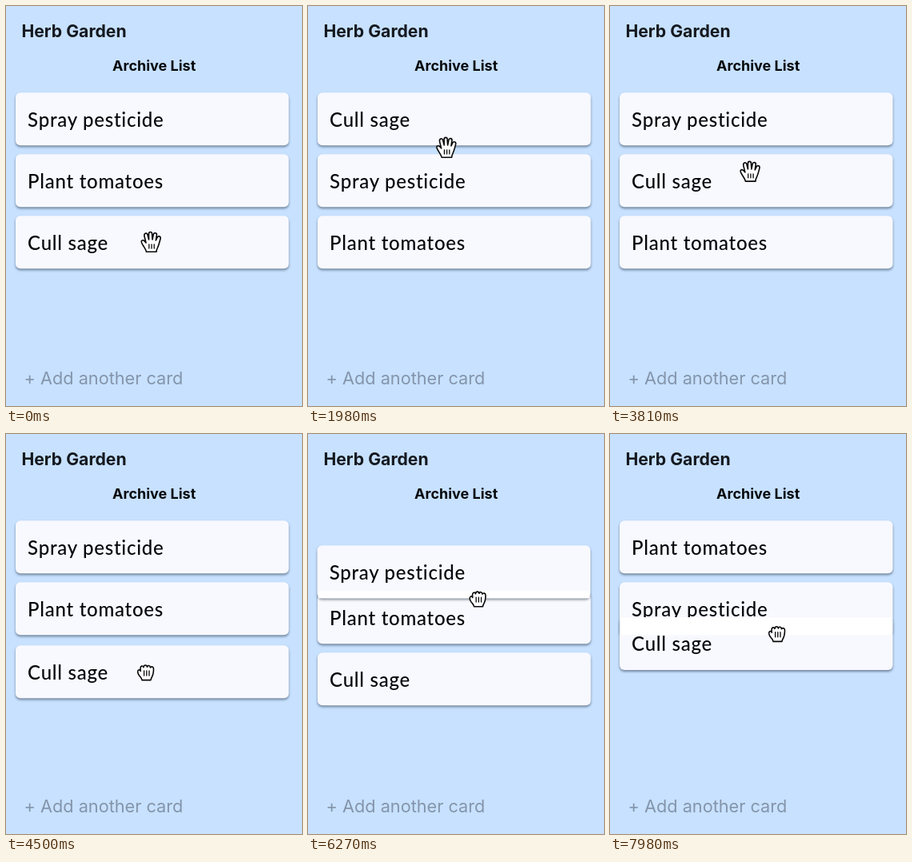
These frames come from a looping animation (370 px wide and 500 px high, 8000 ms). An HTML page:

```html
<!DOCTYPE html>
<html lang="en">
<head>
<meta charset="utf-8">
<title>Herb Garden</title>
<style>
  html, body { margin: 0; width: 100%; height: 100%; overflow: hidden; background: #c7e1ff; }
  svg { display: block; width: 370px; height: 500px; }
  .board { font: 700 21.2px Inter, sans-serif; fill: #15191f; }
  .list { font: 700 18px Inter, sans-serif; fill: #05070a; text-anchor: middle; }
  .add { font: 400 21.7px Inter, sans-serif; fill: #8495ab; }
  .card text { font: 500 24px Lato, sans-serif; letter-spacing: .74px; fill: #05070a; }
  .hand { fill: #fff; stroke: #080808; stroke-width: 1.6; stroke-linejoin: round; stroke-linecap: round; }
</style>
</head>
<body>
<svg viewBox="0 0 370 500" xmlns="http://www.w3.org/2000/svg">
  <defs>
    <filter id="shadow" x="-5%" y="-10%" width="110%" height="130%" color-interpolation-filters="sRGB">
      <feDropShadow dx="0" dy="2" stdDeviation="1.7" flood-color="#10202f" flood-opacity=".48"/>
    </filter>
  </defs>
  <rect width="370" height="500" fill="#c7e1ff"/>
  <text class="board" x="19.4" y="39">Herb Garden</text>
  <text class="list" x="185.2" y="81">Archive List</text>
  <text class="add" x="22.6" y="473">+ Add another card</text>
  <g id="cards"></g>
  <g id="cursor" class="hand">
    <g id="open">
      <path d="M-5.5 12.3C-6 10-8 7-9.5 4.5C-11 2-12.5 0-11.5-1.5C-10-3-8-2-6 1L-8-7C-9-11-5-12.5-4-9L-2.5-3V-10.2C-2.5-13.3 1.5-13.3 1.5-10.2L2-3L3.3-9.5C4-12.5 8-11.5 7.3-8.5L6.3-2L8-5.5C9.5-8.5 12.8-7 12-4C11 0 10 4 8.5 7C7.5 9 7 10.5 7 12.3Z"/>
      <path d="M-2.2 3V8M1 3V8M4.2 3V8" stroke-width="1.3"/>
    </g>
    <g id="closed">
      <path d="M-5 9.6C-5.2 7-7 6-8.6 3.8C-10.5 1-11-2-9.3-3C-8.2-3.6-7.4-2.8-6.8-1.6L-7-5C-7-8.4-4-8.8-3-6.4C-2.8-9.8 1-9.8 1.4-6.8C2.2-9.4 5.2-8.8 5.4-6C6.6-8 9.6-7.2 9.5-4.2C9.4 0 9 3 7.5 5.5C6.6 7 6 8 6 9.6Z"/>
      <path d="M-2.4-2V4M.8-2V4M4-2V4" stroke-width="1.3"/>
    </g>
  </g>
</svg>
<script>
const LOOP = 8000, GLIDE = 260, TRAVEL = 400, PAUSE = 240, HOLD = 50;
const LEFT = 12, TOP = 108.2, PITCH = 77, WIDTH = 341.5, HEIGHT = 66;
const GAP = 11;                     // extra room below a lifted card's slot
const REACH = PITCH - HEIGHT / 2 - 10; // drag distance that swaps the first neighbour
const $ = id => document.getElementById(id);
const slotY = slot => TOP + slot * PITCH;

const cards = ["Spray pesticide", "Plant tomatoes", "Cull sage"]
  .map((label, slot) => ({ label, y: slotY(slot), moves: [] }));
const [spray, plant, cull] = cards;

// A higher pace brakes harder towards the end of the drag.
const drags = [
  { card: cull, slot: 0, grab: 480, stop: 1250, from: [175, 296], to: [173.5, 115], pace: 1 },
  { card: spray, slot: 0, grab: 2400, stop: 2800, from: [172, 222], to: [174, 123], pace: 1 },
  { card: cull, slot: 2, grab: 4140, stop: 4650, from: [175, 219], to: [175, 300], pace: 3 },
  { card: spray, slot: 1, grab: 5960, stop: 6640, from: [213, 175], to: [212, 243], pace: 1 },
  { card: cull, slot: 1, grab: 7840, stop: 8120, from: [209, 283], to: [209, 217], pace: 1 }
];

const clamp = u => Math.max(0, Math.min(1, u));
const mix = (a, b, u) => a + (b - a) * u;
const mixPoint = (a, b, u) => a.map((v, i) => mix(v, b[i], u));
const easeOut = (u, power = 2) => 1 - (1 - u) ** power;
const smooth = u => u * u * (3 - 2 * u);

// Work out when every card glides to which height.
let order = cards.slice(), rest = [181, 295];
for (const drag of drags) {
  const slot = order.indexOf(drag.card), dir = Math.sign(drag.slot - slot);
  const distance = Math.abs(drag.to[1] - drag.from[1]);
  drag.rest = rest;
  drag.leave = Math.max(0, drag.grab - PAUSE - TRAVEL);
  drag.release = drag.stop + HOLD;
  rest = drag.to;

  order.slice(slot + 1).forEach((card, i) =>
    card.moves.push({ at: drag.grab, y: slotY(slot + 1 + i) + GAP }));
  for (let k = 1; k <= Math.abs(drag.slot - slot); k++) {
    const share = (REACH + (k - 1) * PITCH) / distance;
    const at = mix(drag.grab, drag.stop, easeOut(clamp(share), 1 / drag.pace));
    const y = slotY(slot + dir * (k - 1)) + (dir < 0 ? GAP : 0);
    order[slot + dir * k].moves.push({ at, y });
  }
  order = order.filter(card => card !== drag.card);
  order.splice(drag.slot, 0, drag.card);
  order.forEach((card, i) =>
    card.moves.push({ at: drag.release, y: slotY(i), drag: card === drag.card && drag }));
}

const dragAt = (t, key) => drags.filter(drag => t >= drag[key]).pop();

function pointerAt(t) {
  const { rest, leave, grab, stop, from, to, pace } = dragAt(t, "leave") || drags[0];
  if (t < grab) return mixPoint(rest, from, smooth(clamp((t - leave) / (grab - PAUSE - leave))));
  return mixPoint(from, to, easeOut(clamp((t - grab) / (stop - grab)), pace));
}

function cardAt(card, t) {
  let x = LEFT, y = card.y;
  for (const { at, y: target, drag } of card.moves) {
    if (drag && t >= drag.grab) {
      const [px, py] = pointerAt(Math.min(t, at));
      x += px - drag.from[0];
      y += py - drag.from[1];
    }
    if (t < at) break;
    const u = easeOut(clamp((t - at) / GLIDE));
    x = mix(x, LEFT, u);
    y = mix(y, target, u);
  }
  return { x, y };
}

function add(parent, tag, attrs) {
  const node = document.createElementNS("http://www.w3.org/2000/svg", tag);
  for (const key in attrs) node.setAttribute(key, attrs[key]);
  return parent.appendChild(node);
}

for (const card of cards) {
  card.node = add($("cards"), "g", {});
  card.node.classList.add("card");
  add(card.node, "rect", { width: WIDTH, height: HEIGHT, rx: 6, fill: "#f8f9ff", filter: "url(#shadow)" });
  card.overlap = add(card.node, "path", { fill: "#fff" });
  add(card.node, "text", { x: 15.1, y: 42.4 }).textContent = card.label;
}

// White bands where the lifted card covers another one.
function overlapPath(top, others) {
  return others.map(other => {
    const dx = other.x - top.x, dy = other.y - top.y;
    const from = Math.max(0, dy), to = Math.min(HEIGHT, dy + HEIGHT);
    const left = Math.max(0, dx) + 1, right = WIDTH + Math.min(0, dx) - 1;
    return to > from ? `M${left} ${from}H${right}V${to}H${left}Z` : "";
  }).join("");
}

function render(t) {
  const lifted = dragAt(t, "grab") || drags[0];
  const places = cards.map(card => cardAt(card, t));

  cards.forEach((card, i) => {
    const others = places.filter((_, j) => j !== i);
    card.node.setAttribute("transform", `translate(${places[i].x} ${places[i].y})`);
    card.overlap.setAttribute("d", card === lifted.card ? overlapPath(places[i], others) : "");
  });
  if ($("cards").lastChild !== lifted.card.node) $("cards").appendChild(lifted.card.node);

  const held = t >= lifted.grab && t < lifted.release;
  $("cursor").setAttribute("transform", `translate(${pointerAt(t)})`);
  $("open").style.display = held ? "none" : "";
  $("closed").style.display = held ? "" : "none";
}

const startTime = performance.now();
function tick() {
  render((performance.now() - startTime) % LOOP);
  requestAnimationFrame(tick);
}
tick();
</script>
</body>
</html>
```
